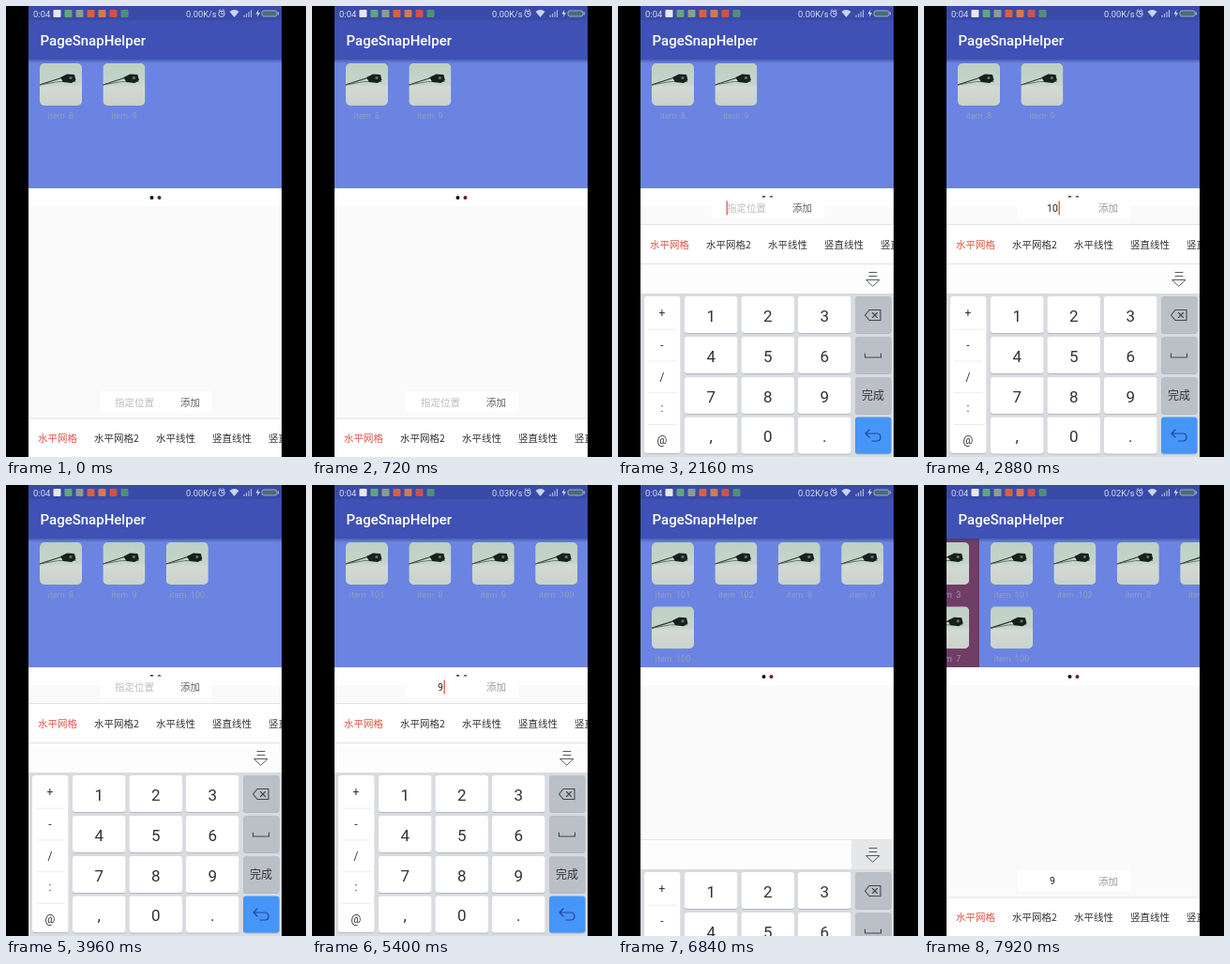
Recreate the animation shown at these times as an HTML page. Size 320 by 480 pixels, loop 8 s.

```html
<!DOCTYPE html>
<html lang="zh">
<head>
<meta charset="utf-8">
<title>PageSnapHelper</title>
<style>
  html, body { margin: 0; width: 100%; height: 100%; overflow: hidden; background: #000; }
  svg { display: block; width: 100vw; height: 100vh; }
  text { font-family: Roboto, "Noto Sans CJK SC", "Noto Sans CJK", sans-serif; white-space: pre; }
  .mid { text-anchor: middle; }
  .cjk { font: 10.5px "Noto Sans CJK SC", "Noto Sans CJK", sans-serif; }
  .line { fill: none; stroke-linecap: round; stroke-linejoin: round; }
</style>
</head>
<body>
<svg viewBox="0 0 320 480">
  <defs>
    <clipPath id="screen"><rect x="24" width="270" height="480"/></clipPath>
    <clipPath id="card"><rect width="45" height="45" rx="5"/></clipPath>
    <linearGradient id="wall" x2="0" y2="1">
      <stop offset="0" stop-color="#bdd0c3"/>
      <stop offset=".5" stop-color="#c6d5cc"/>
      <stop offset=".56" stop-color="#d3d9d4"/>
      <stop offset="1" stop-color="#cbd2cc"/>
    </linearGradient>
    <linearGradient id="shade" x2="0" y2="1">
      <stop offset="0" stop-color="#2b3a83" stop-opacity=".5"/>
      <stop offset="1" stop-color="#2b3a83" stop-opacity="0"/>
    </linearGradient>
    <g id="photo" clip-path="url(#card)">
      <rect width="45" height="45" fill="url(#wall)"/>
      <path d="M0 23L23 15.5L27 17" class="line" stroke="#343c38" stroke-width="1.3"/>
      <path d="M0 23L20 19.5H38" class="line" stroke="#59635e" stroke-width=".8"/>
      <path d="M22 15L29 11.5L37 12L38.5 18L34 21L25 20Z" fill="#18201e"/>
      <circle cx="33" cy="15.5" r="1.6" fill="#65736b"/>
    </g>
  </defs>
  <rect width="320" height="480" fill="#000"/>
  <g clip-path="url(#screen)">
    <rect x="24" width="270" height="480" fill="#fafafa"/>
    <g id="pages"></g>
    <rect x="24" y="57" width="270" height="4" fill="url(#shade)"/>
    <rect x="24" y="194" width="270" height="19" fill="#fff"/>
    <circle cx="155.5" cy="204" r="2" fill="#111"/>
    <circle cx="163.5" cy="204" r="2" fill="#6b1d1d"/>
    <g id="footer"></g>
    <g id="keyboard"></g>
    <rect x="24" width="270" height="57" fill="#3f51b5"/>
    <rect x="24" width="270" height="15" fill="#3a4aa8"/>
    <g id="status"></g>
    <text x="36.5" y="42" font-size="15" font-weight="500" fill="#fff">PageSnapHelper</text>
  </g>
</svg>
<script>
const $ = id => document.getElementById(id);
const LOOP = 8000, STEP = 360, PAGE = 270;

const rect = (x, y, w, h, fill, rx = 0) =>
  `<rect x="${x}" y="${y}" width="${w}" height="${h}" fill="${fill}" rx="${rx}"/>`;
const label = (x, y, s, size, fill, extra = 'class="mid"') =>
  `<text x="${x}" y="${y}" font-size="${size}" fill="${fill}" ${extra}>${s}</text>`;
const line = (d, stroke, width = 1) =>
  `<path class="line" d="${d}" stroke="${stroke}" stroke-width="${width}"/>`;

function buildStatus() {
  const badges = ['#e9e6ee', '#5fa77b', '#8b9c90', '#d9603f', '#d37a50', '#cf5148', '#4f8f78'];
  $('status').innerHTML =
    label(29, 11.5, '0:04', 9.5, '#d5daf3', '') +
    badges.map((c, i) => rect(50.5 + i * 12, 4, 8, 8, c, 1)).join('') +
    label(192, 11.5, '', 9.3, '#d5daf3', 'id="speed"') +
    line('M230 5.5V8.5H232M227 5L228.5 3.7M233 5L231.5 3.7', '#ccd3f0', .9) +
    '<circle cx="230" cy="8.3" r="3.2" fill="none" stroke="#ccd3f0"/>' +
    '<path d="M238.5 6Q243.5 2 248.5 6L243.5 12Z" fill="#ccd3f0"/>' +
    line('M254 11.5V10M256.5 11.5V8.5M259 11.5V6.5M261.5 11.5V4.5', '#aeb7e2', 1.2) +
    '<path d="M269.5 3.8L266.5 8.5H268.7L267.8 12L271 7.2H268.8Z" fill="#dce1f8"/>' +
    '<rect x="273" y="5" width="16" height="6" rx="2" fill="#4a6b78" stroke="#a8b4c8" stroke-width=".9"/>' +
    rect(289.7, 6.5, 1.3, 3, '#a8b4c8');
}

function buildFooter() {
  const tabs = [[34, '水平网格'], [94, '水平网格2'], [160, '水平线性'], [220, '竖直线性'], [280, '竖直网格']];
  $('footer').innerHTML =
    rect(100, 410, 120, 22.5, '#fff') +
    label(116, 425.5, '指定位置', 10.5, '#bdbdbd', 'id="hint" class="cjk"') +
    label(137, 425, '', 10.5, '#222', 'id="value" class="mid"') +
    '<rect id="caret" y="414" width="1.4" height="15" fill="#e0624c"/>' +
    label(186, 425.5, '添加', 10.5, '#666', 'id="add" class="cjk"') +
    rect(24, 439, 270, 42, '#fff') + rect(24, 438.5, 270, 1, '#e2e2e2') +
    tabs.map(([x, s], i) =>
      label(x, 464, s, 10.5, i ? '#333' : '#dc5442', 'class="cjk" style="font-weight:500"')).join('');
}

function buildKeyboard() {
  const rows = [309, 352, 395, 437.5], cols = [71, 131.5, 192];
  const key = (x, y, w, fill) => rect(x, y + 1, w, 39, '#b5b9bf', 3) + rect(x, y, w, 39, fill, 3);
  const ink = '#43484c';
  let out = rect(24, 274, 270, 33, '#fdfdfd') + rect(24, 274, 270, .8, '#dedede') +
    '<rect id="pressed" x="249" y="275" width="45" height="31" fill="#e6e7e8"/>' +
    line('M268 283.5H276M268 287.5H276M265 291.5H279L272 298Z', '#555b60') +
    rect(24, 306, 270, 220, '#d8dbe0') + rect(28, 310, 38.5, 167, '#b5b9bf', 3) +
    rect(28, 309, 38.5, 167, '#fff', 3);
  [...'+-/:@'].forEach((s, i) => {
    const y = 327 + i * 33.8;
    out += label(47, y + 4, s, 12, '#333');
    if (i) out += rect(32, y - 17, 31, .7, '#e3e4e6');
  });
  [...'123456789,0.'].forEach((s, i) => {
    const x = cols[i % 3], y = rows[i / 3 | 0];
    out += key(x, y, 56.5, '#fff') + label(x + 28.2, y + 26.5, s, 17, '#333');
  });
  rows.forEach((y, i) => out += key(253, y, 38.5, i < 3 ? '#bbc0c6' : '#4596f8'));
  out += line('M263.5 329L268 323.5H280V334.5H268ZM271.5 326.5L276.5 331.5M276.5 326.5L271.5 331.5', ink, 1.1) +
    line('M263.5 370V374H280.5V370', ink, 1.2) +
    label(272, 419, '完成', 12, '#333', 'class="mid cjk" style="font-size:12px;font-weight:500"') +
    line('M268 451L264 455L268 459M264 455H276Q280 455 280 459T276 463H271', '#26469c', 1.2);
  $('keyboard').innerHTML = out;
}

function page(index, names, color) {
  const left = 24 + index * PAGE;
  return rect(left, 57, PAGE, 137, color) + names.map((name, i) => {
    const x = left + 12 + i % 4 * 67.4, y = 61 + (i >> 2) * 68.3;
    return `<use href="#photo" x="${x}" y="${y}"/>` +
      label(x + 22.5, y + 59, 'item  ' + name, 9, '#939cc0');
  }).join('');
}

// Each entry changes the state from its time onward.
const script = [
  [0, { items: [8, 9], text: '', caret: 0, raised: 0, drop: 230, pressed: 0, speed: '0.00', scroll: 0 }],
  [1080, { drop: 100, caret: 1 }],
  [1440, { drop: 8, raised: 1 }],
  [1800, { drop: 0, caret: 0 }],
  [2160, { caret: 1 }],
  [2520, { text: '1' }],
  [2880, { text: '10' }],
  [3600, { items: [8, 9, 100], caret: 0 }],
  [3960, { text: '' }],
  [4320, { text: '8', caret: 1 }],
  [5040, { items: [101, 8, 9, 100], caret: 0, speed: '0.03' }],
  [5400, { text: '9', caret: 1 }],
  [6120, { items: [101, 102, 8, 9, 100], caret: 0 }],
  [6480, { raised: 0, drop: 12, pressed: 1, speed: '0.02' }],
  [6840, { drop: 103 }],
  [7200, { drop: 230, pressed: 0 }],
  [7920, { scroll: 35 }]
];

function render(ms) {
  const s = {};
  for (const [at, change] of script) if (at <= ms) Object.assign(s, change);
  $('pages').innerHTML = page(0, [0, 1, 2, 3, 4, 5, 6, 7], '#6f3d66') + page(1, s.items, '#6b84e1');
  $('pages').setAttribute('transform', `translate(${s.scroll - PAGE})`);
  $('footer').setAttribute('transform', `translate(0 ${s.raised ? -206.5 : 0})`);
  $('keyboard').setAttribute('transform', `translate(0 ${s.drop})`);
  $('pressed').style.display = s.pressed ? '' : 'none';
  $('hint').style.display = s.text ? 'none' : '';
  $('value').textContent = s.text;
  $('caret').style.display = s.caret ? '' : 'none';
  $('caret').setAttribute('x', s.text ? 137 + s.text.length * 3 + .5 : 115.5);
  $('add').setAttribute('fill', s.text ? '#999' : '#5c5f5c');
  $('speed').textContent = s.speed + 'K/s';
}

buildStatus();
buildFooter();
buildKeyboard();

let shown = -1;
function tick() {
  const step = Math.floor(performance.now() % LOOP / STEP);
  if (step !== shown) render((shown = step) * STEP);
  requestAnimationFrame(tick);
}
tick();
</script>
</body>
</html>
```
